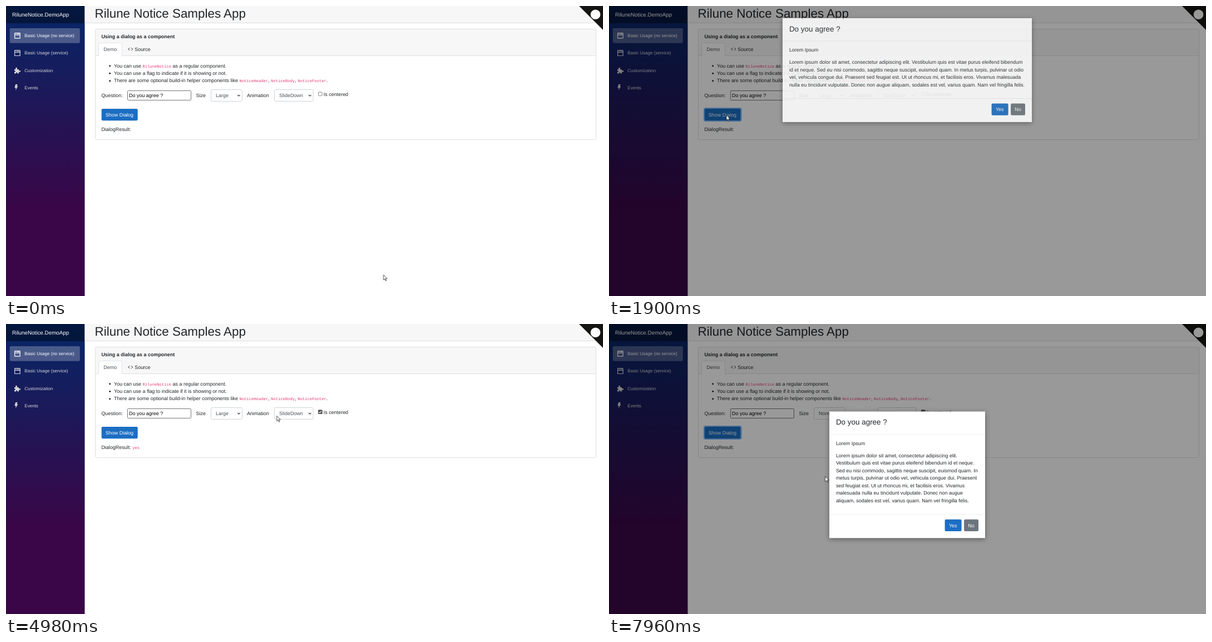
An HTML page that plays this animation: 1073x522 px, repeating every 8000 ms.

```html
<!DOCTYPE html>
<html lang="en">
<head>
<meta charset="utf-8">
<title>Dialog demo</title>
<style>
html, body { margin: 0; width: 100%; height: 100%; overflow: hidden; background: #fff; }
svg { display: block; width: 1073px; height: 522px; }
text { font: 8.96px "Liberation Sans", Arial, sans-serif; fill: #212529; text-rendering: geometricPrecision; white-space: pre; }
.code { font: 7.18px "Liberation Mono", Consolas, monospace; fill: #e63a74; }
.brand { font-size: 9.86px; fill: #fff; }
.nav text { font-size: 8.06px; fill: #d7d7d7; }
.nav .on { fill: #fff; }
.h1 { font-size: 22.4px; }
.h4 { font-size: 13.44px; }
.bold { font-weight: bold; }
.soft { fill: #495057; }
.light { fill: #fff; }
.line { fill: none; stroke: #dfdfdf; }
.field { fill: #fff; stroke: #ced4da; }
.chev { fill: none; stroke: #343a40; stroke-width: 1.2; }
.btn { fill: #1b6ec2; }
.hover { fill: #0069d9; }
.ring { fill: none; stroke: #79b8fb; stroke-width: 2; }
.pick { fill: #1e90ff; }
.sheet { fill: #fff; filter: drop-shadow(0 2px 4px rgba(0, 0, 0, .4)); }

/* parts that are only present for a while */
.part, .hover, .ring { opacity: 0; animation: 8s step-end infinite; }
#show-hover { animation-name: show-hover; }
#show-ring { animation-name: show-ring; }
#backdrop { animation-name: backdrop; }
#large .hover { animation-name: yes-hover; }
#large .ring { animation-name: yes-ring; }
#result { animation-name: result; }
#check { animation-name: check; }
#size-ring { animation-name: size-ring; }
#list { animation-name: list; }
#pick-large { animation-name: pick-large; }
#pick-normal { animation-name: pick-normal; }
#size-normal { animation-name: size-normal; }
#size-large { opacity: 1; animation-name: size-large; }
#click { animation-name: click; }
#hand { animation-name: hand; }
#arrow { opacity: 1; animation-name: arrow; }
#large { animation: slide-large 8s ease infinite; }
#medium { animation: slide-medium 8s ease infinite; }
#cursor { animation: move 8s ease-in-out infinite; }

@keyframes show-hover { 10.3% { opacity: 1 } 22.6% { opacity: 0 } 87.5% { opacity: 1 } 90.9% { opacity: 0 } }
@keyframes show-ring { 21.6% { opacity: 1 } 38.9% { opacity: 0 } 90% { opacity: 1 } 100% { opacity: 1 } }
@keyframes backdrop { 21.6% { opacity: .4 } 41% { opacity: 0 } 90% { opacity: .4 } 100% { opacity: .4 } }
@keyframes yes-hover { 33.5% { opacity: 1 } 41% { opacity: 0 } }
@keyframes yes-ring { 38.9% { opacity: 1 } 41% { opacity: 0 } }
@keyframes result { 41% { opacity: 1 } 90% { opacity: 0 } }
@keyframes check { 52.75% { opacity: 1 } 100% { opacity: 1 } }
@keyframes size-ring { 67.25% { opacity: .5 } 68.25% { opacity: 1 } 88.875% { opacity: 0 } }
@keyframes list { 67.25% { opacity: 1 } 80% { opacity: 0 } }
@keyframes pick-large { 67.25% { opacity: 1 } 72.1% { opacity: 0 } }
@keyframes pick-normal { 72.1% { opacity: 1 } 80% { opacity: 0 } }
@keyframes size-normal { 80% { opacity: 1 } 100% { opacity: 1 } }
@keyframes size-large { 80% { opacity: 0 } 100% { opacity: 0 } }
@keyframes click {
  20.5% { opacity: .62 } 21.6% { opacity: 0 }
  38.9% { opacity: .62 } 41% { opacity: 0 }
  52.75% { opacity: .62 } 54.75% { opacity: 0 }
  66.5% { opacity: .62 } 68.25% { opacity: 0 }
  79% { opacity: .62 } 80% { opacity: 0 }
  88.875% { opacity: .62 } 90% { opacity: 0 }
}
@keyframes hand {
  10.3% { opacity: 1 } 21.6% { opacity: 0 }
  33.5% { opacity: 1 } 41% { opacity: 0 }
  87.5% { opacity: 1 } 90% { opacity: 0 }
}
@keyframes arrow {
  10.3% { opacity: 0 } 21.6% { opacity: 1 }
  33.5% { opacity: 0 } 41% { opacity: 1 }
  87.5% { opacity: 0 } 90% { opacity: 1 }
}
@keyframes slide-large {
  0%, 21.6% { opacity: 0; transform: translateY(-22px) }
  25.4%, 40.99% { opacity: 1; transform: translateY(0) }
  41%, 100% { opacity: 0; transform: translateY(0) }
}
@keyframes slide-medium {
  0%, 90.4% { opacity: 0; transform: translateY(-22px) }
  94.2%, 100% { opacity: 1; transform: translateY(0) }
}
@keyframes move {
  0%, .5% { transform: translate(678.5px, 484px) }
  10.5% { transform: translate(206px, 199px) }
  15.5% { transform: translate(210px, 197.5px) }
  17.5%, 24.4% { transform: translate(211px, 196.5px) }
  34% { transform: translate(690px, 193px) }
  38.5%, 42% { transform: translate(697px, 190.5px) }
  49.75% { transform: translate(565.5px, 158px) }
  57.5% { transform: translate(565.5px, 158px); animation-timing-function: ease-in }
  62.25% { transform: translate(487px, 165.5px); animation-timing-function: ease-out }
  67.25%, 70.5% { transform: translate(402px, 161.5px) }
  73.1% { transform: translate(402px, 178px) }
  75.1%, 80% { transform: translate(401.5px, 179px) }
  88%, 95.9% { transform: translate(213px, 193.5px) }
  99.5%, 100% { transform: translate(388.5px, 274.5px) }
}
</style>
</head>
<body>
<svg viewBox="0 0 1073 522">
  <defs>
    <linearGradient id="side" x1="0" y1="0" x2="0" y2="1">
      <stop offset="0" stop-color="#052767"/>
      <stop offset=".7" stop-color="#3a0647"/>
    </linearGradient>
    <g id="window">
      <rect x=".6" y=".6" width="9.6" height="9.6" rx=".6" fill="none" stroke="currentColor" stroke-width="1.2"/>
      <path d="M0 4.2H10.8M2 2.4H3.4M4.4 2.4H9" stroke="currentColor" stroke-width="1.1"/>
    </g>
  </defs>

  <!-- sidebar -->
  <rect width="141.5" height="522" fill="url(#side)"/>
  <rect width="141.5" height="31" fill-opacity=".4"/>
  <text class="brand" x="11" y="18.6">RiluneNotice.DemoApp</text>
  <rect x="6.7" y="39.9" width="126.1" height="26.9" rx="2.2" fill="#fff" fill-opacity=".25"/>
  <g class="nav">
    <use href="#window" x="15" y="48" color="#fff"/>
    <use href="#window" x="15" y="79.3" color="#d7d7d7"/>
    <path d="M15 114H17.4Q16.6 110.8 18.6 110.8T19.8 114H23V116.4Q26.2 115.4 26.2 117.4T23 118.6V121.6H20.4Q20.8 119.6 19.2 119.6T18 121.6H15V118.8Q17 119 17 117.6T15 116.6Z" fill="#d7d7d7"/>
    <path d="M17.2 141H20.8L19.4 144.2H21.4L17 152L17.8 147.2H15.4Z" fill="#d7d7d7"/>
    <text class="on" x="33.3" y="56">Basic Usage (no service)</text>
    <text x="33.3" y="87.4">Basic Usage (service)</text>
    <text x="33.3" y="118.8">Customization</text>
    <text x="33.3" y="150.2">Events</text>
  </g>

  <!-- top bar -->
  <rect x="141.5" width="931.5" height="30" fill="#f7f7f7"/>
  <path class="line" d="M141.5 30.5H1073"/>
  <text class="h1" x="159.6" y="20.7">Rilune Notice Samples App</text>
  <path d="M1030 0H1073V43Z" fill="#151513"/>
  <circle cx="1059.5" cy="15.3" r="8.8" fill="#fff"/>

  <!-- card -->
  <rect x="160.5" y="41.5" width="900" height="48" fill="#f7f7f7"/>
  <rect class="line" x="160.5" y="41.5" width="900" height="199" rx="2.2"/>
  <path class="line" d="M160.5 89.5H1060.5"/>
  <path d="M166.5 90V68.7Q166.5 66.5 168.7 66.5H206.3Q208.5 66.5 208.5 68.7V90" fill="#fff" stroke="#dee2e6"/>
  <text class="bold" x="171.4" y="57.9">Using a dialog as a component</text>
  <text class="soft" x="175.3" y="80.7">Demo</text>
  <path d="M222.4 75.4L219.6 77.6L222.4 79.8M225.2 75.4L228 77.6L225.2 79.8" fill="none" stroke="#343a40"/>
  <text x="231.2" y="80.7">Source</text>

  <circle cx="186.7" cy="107.8" r="1.5" fill="#212529"/>
  <circle cx="186.7" cy="121.2" r="1.5" fill="#212529"/>
  <circle cx="186.7" cy="134.7" r="1.5" fill="#212529"/>
  <text x="194" y="110.5">You can use <tspan class="code">RiluneNotice</tspan> as a regular component.</text>
  <text x="194" y="123.9">You can use a flag to indicate if it is showing or not.</text>
  <text x="194" y="137.4">There are some optional build-in helper components like <tspan class="code">NoticeHeader</tspan>, <tspan class="code">NoticeBody</tspan>, <tspan class="code">NoticeFooter</tspan>.</text>

  <!-- form -->
  <text x="171.4" y="163.8">Question:</text>
  <rect x="218.5" y="152.5" width="114" height="17" rx="1" fill="#fff" stroke="#767676"/>
  <text x="221" y="163.8" style="fill:#000">Do you agree ?</text>
  <text x="341.6" y="163.8">Size</text>
  <rect class="field" x="368.5" y="150.5" width="56" height="21" rx="2.2"/>
  <rect class="ring" id="size-ring" x="367" y="149" width="58.5" height="23.5" rx="2.8"/>
  <text class="soft part" id="size-large" x="377" y="163.8">Large</text>
  <text class="soft part" id="size-normal" x="377" y="163.8">Normal</text>
  <path class="chev" d="M416.2 159.9L418.4 162.1L420.6 159.9"/>
  <text x="432.9" y="163.8">Animation</text>
  <rect class="field" x="482.5" y="150.5" width="69.5" height="21" rx="2.2"/>
  <text class="soft" x="491" y="163.8">SlideDown</text>
  <path class="chev" d="M544 159.9L546.2 162.1L548.4 159.9"/>
  <rect x="561.5" y="155" width="6.6" height="6.6" rx="1" fill="#fff" stroke="#767676" stroke-width=".9"/>
  <g class="part" id="check">
    <rect x="561" y="154.6" width="7.5" height="7.5" rx="1" fill="#555"/>
    <path d="M562.5 158.4L564.1 160L567 156.6" fill="none" stroke="#fff" stroke-width="1.1"/>
  </g>
  <text x="570.8" y="161.5">Is centered</text>

  <rect class="btn" x="171.7" y="185" width="65" height="21.3" rx="2.2"/>
  <rect class="hover" id="show-hover" x="171.7" y="185" width="65" height="21.3" rx="2.2"/>
  <rect class="ring" id="show-ring" x="170.9" y="184.1" width="66.6" height="23" rx="2.8"/>
  <text class="light" x="178.8" y="198.7">Show Dialog</text>
  <text x="171.4" y="224.9">DialogResult:</text>
  <text class="code part" id="result" x="227.2" y="224.9">yes</text>

  <g class="part" id="list">
    <rect x="368.3" y="172.2" width="56.4" height="38.4" fill="#fff" stroke="#767676" stroke-width=".6"/>
    <text class="soft" x="377" y="182">Normal</text>
    <text class="soft" x="377" y="194">Large</text>
    <text class="soft" x="377" y="206">ExtraLarge</text>
    <g class="part" id="pick-normal">
      <rect class="pick" x="368.6" y="172.6" width="55.8" height="12"/>
      <text class="light" x="377" y="182">Normal</text>
    </g>
    <g class="part" id="pick-large">
      <rect class="pick" x="368.6" y="184.6" width="55.8" height="12"/>
      <text class="light" x="377" y="194">Large</text>
    </g>
  </g>

  <rect class="part" id="backdrop" width="1073" height="522"/>
  <g id="large"></g>
  <g id="medium"></g>

  <g id="cursor">
    <circle class="part" id="click" cx="-.2" cy=".2" r="7" fill="#ffe600"/>
    <path class="part" id="arrow" d="M0 0V9.2L2.2 7.2L3.8 10.7L5.2 10.1L3.7 6.7H6.7Z" fill="#fff" stroke="#000" stroke-width=".7"/>
    <path class="part" id="hand" d="M-1 1.2Q-1 0 0 0T1 1.2V4.4L5 5.2Q6 5.5 6 6.6L5.2 11.8H-.2L-3.3 7.8Q-3.4 6.6 -2.2 6.7L-1 7.8Z" fill="#fff" stroke="#000" stroke-width=".7"/>
  </g>
</svg>
<script>
const text = (x, y, s, cls = '') => `<text class="${cls}" x="${x}" y="${y}">${s}</text>`;
const rect = (x, y, w, h, attrs) => `<rect x="${x}" y="${y}" width="${w}" height="${h}" ${attrs}/>`;

function dialog(id, x, y, w, h, lines) {
  const yes = w - 72.4, no = w - 37.9, top = h - 33.5;
  const rule = at => `<path d="M0 ${at}H${w}" stroke="#e9ecef" stroke-width=".8"/>`;
  document.getElementById(id).innerHTML = `<g transform="translate(${x} ${y})">` +
    rect(0, 0, w, h, 'class="sheet"') +
    text(11.9, 23.8, 'Do you agree ?', 'h4') + rule(41.2) +
    text(11.9, 60, 'Lorem Ipsum') +
    lines.map((s, i) => text(11.9, 82.5 + i * 13.44, s)).join('') +
    rule(h - 42.4) +
    rect(yes, top, 30, 21.3, 'rx="2.2" class="btn"') +
    rect(yes, top, 30, 21.3, 'rx="2.2" class="hover"') +
    rect(yes - .9, top - .9, 31.8, 23.1, 'rx="2.8" class="ring"') +
    text(yes + 7.3, top + 13.7, 'Yes', 'light') +
    rect(no, top, 25.9, 21.3, 'rx="2.2" fill="#6c757d"') +
    text(no + 7.2, top + 13.7, 'No', 'light') + '</g>';
}

dialog('large', 312, 24.9, 448, 187, [
  'Lorem ipsum dolor sit amet, consectetur adipiscing elit. Vestibulum quis est vitae purus eleifend bibendum',
  'id et neque. Sed eu nisi commodo, sagittis neque suscipit, euismod quam. In metus turpis, pulvinar ut odio',
  'vel, vehicula congue dui. Praesent sed feugiat est. Ut ut rhoncus mi, et facilisis eros. Vivamus malesuada',
  'nulla eu tincidunt vulputate. Donec non augue aliquam, sodales est vel, varius quam. Nam vel fringilla felis.'
]);
dialog('medium', 396, 157.5, 280, 227.8, [
  'Lorem ipsum dolor sit amet, consectetur adipiscing elit.',
  'Vestibulum quis est vitae purus eleifend bibendum id et neque.',
  'Sed eu nisi commodo, sagittis neque suscipit, euismod quam. In',
  'metus turpis, pulvinar ut odio vel, vehicula congue dui. Praesent',
  'sed feugiat est. Ut ut rhoncus mi, et facilisis eros. Vivamus',
  'malesuada nulla eu tincidunt vulputate. Donec non augue',
  'aliquam, sodales est vel, varius quam. Nam vel fringilla felis.'
]);
</script>
</body>
</html>
```
